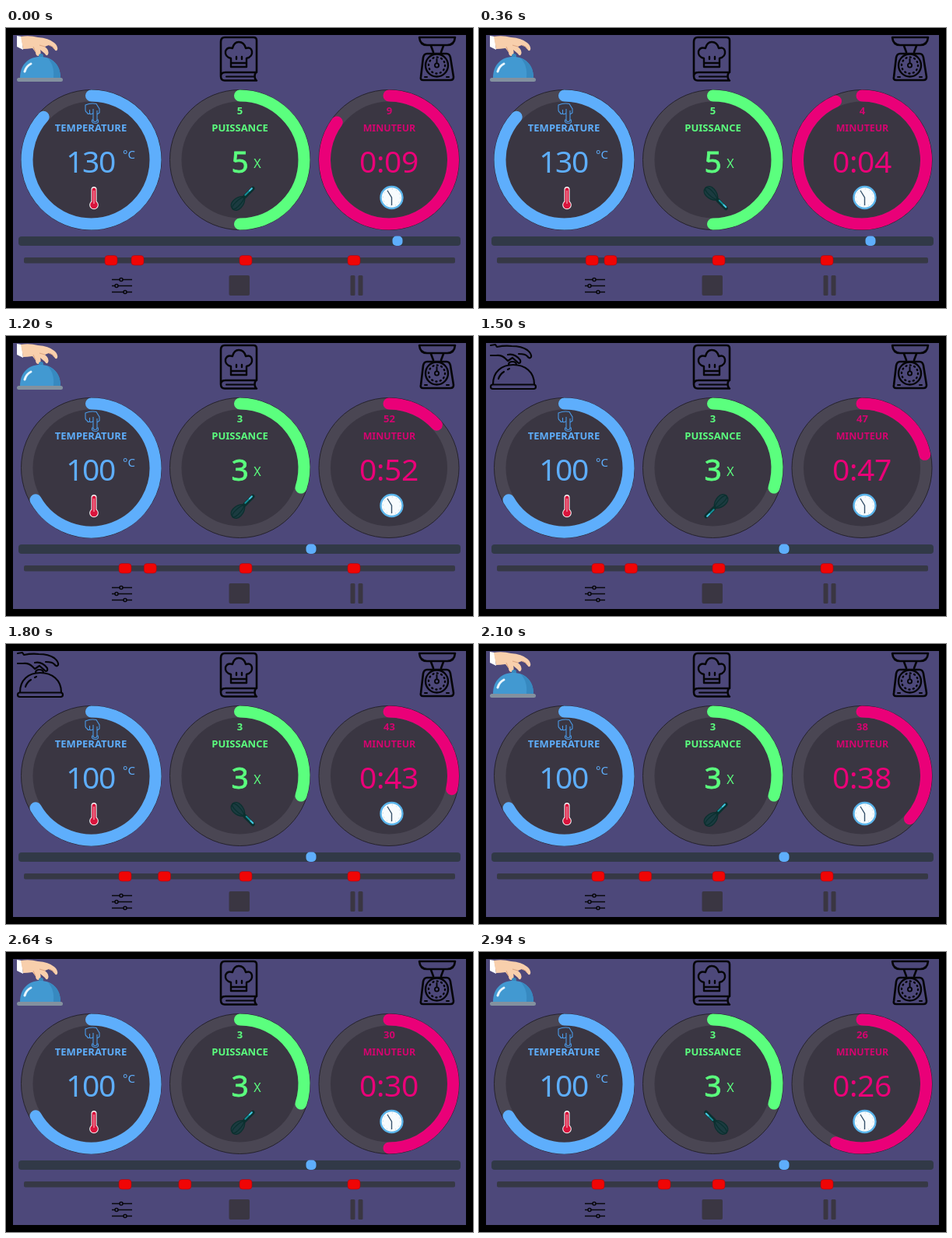
Animation of 600x360 px, one loop 3000 ms. Source, as an HTML page:

```html
<!DOCTYPE html>
<html lang="fr">
<head>
<meta charset="utf-8">
<title>Robot de cuisine</title>
<style>
  html, body { margin: 0; width: 100%; height: 100%; overflow: hidden; background: #000; }
  svg { display: block; width: 600px; height: 360px; }
  text { text-anchor: middle; }
  .title { font: bold 13px "Noto Sans", sans-serif; }
  .value { font: 39px "Noto Sans", sans-serif; letter-spacing: -1.4px; }
  .unit { font: 16px "Noto Sans", sans-serif; }
  .line { fill: none; stroke: #050508; stroke-linecap: round; stroke-linejoin: round; }
  .arc { fill: none; stroke-width: 15; stroke-linecap: round; }
</style>
</head>
<body>
<svg viewBox="0 0 600 360">
  <rect x="9" y="9" width="582" height="342" fill="#4d487a"/>

  <!-- serving dome -->
  <g id="domeColor">
    <path d="M14 10L20 11L22 28L14 24Z" fill="#fff"/>
    <path d="M19 11Q30 9 41 12Q55 13 62 19Q67 23 66 28Q64 31 62 27Q60 23 55 22L50 24Q56 29 54 34Q52 37 50 33L44 28Q46 33 42 36Q38 36 38 31L34 26Q27 27 22 27Z" fill="#f8cfac"/>
    <path d="M50 24L43 22M38 31L35 24M62 27Q60 23 55 22" fill="none" stroke="#dca582"/>
    <circle cx="45" cy="36" r="3" fill="#3889bd"/>
    <path d="M18 64C18 47 29 37 44 37S70 47 70 64Z" fill="#4299d1"/>
    <path d="M54 39C65 43 70 52 70 64H61C62 54 60 46 54 39Z" fill="#3789c0"/>
    <path d="M24 56Q26 49 32 46" fill="none" stroke="#e9f6ff" stroke-width="3" stroke-linecap="round"/>
    <rect x="14" y="64" width="59" height="5" rx="2.5" fill="#83919f"/>
  </g>
  <g id="domeLine" class="line" stroke-width="2.2">
    <path d="M15 12L21 11L23 14Q33 12 42 13Q55 13 62 18Q68 23 67 27Q65 30 62 26Q60 23 51 23M15 25L22 25Q29 24 34 29M37 24Q46 22 53 31Q54 35 51 35L43 28L37 32L34 29"/>
    <path d="M38 37Q38 33 43 33Q48 33 48 37M18 62C18 46 29 37 44 37S71 46 71 62M25 55Q27 49 32 46M37 43L39 42"/>
    <rect x="15" y="62.500" width="58" height="5.500" rx="2.700"/>
  </g>

  <!-- recipe book -->
  <g class="line" stroke-width="2.600">
    <path d="M322 57V16Q322 12 318 12H281Q276 12 276 18V62Q276 67.500 281 67.500H322M322 57H282Q276 57 276 62M321 57Q318 62 321 67"/>
    <path d="M283 62.500H318" stroke-width="2"/>
    <path d="M289 50V39Q281 37 282 30Q284 24 291 26Q293 18 299 18Q306 18 308 26Q315 24 316 30Q317 37 309 39V50ZM289 45H309M296 37V40M303 37V40" stroke-width="2.400"/>
  </g>

  <!-- scale -->
  <g class="line" stroke-width="2.600">
    <path d="M531 12H577Q576 22 567 22H541Q532 22 531 12ZM546 23L549 31M562 23L559 31M541 33H566Q570 33 571 38L575 63Q575 67 571 67H536Q532 67 533 63L536 38Q537 33 541 33Z"/>
    <circle cx="553.500" cy="48" r="14.500" stroke-width="2.400"/>
    <circle cx="553.500" cy="48" r="10.500" stroke-width="2.400" stroke-dasharray="1 4.500"/>
    <circle cx="553.500" cy="48" r="2.600" stroke-width="1.800"/>
    <path d="M553.500 45V40M538 63H541M566 63H569" stroke-width="2"/>
  </g>

  <g id="dials"></g>

  <!-- pointing hand -->
  <path d="M102 99Q109 96 116 97.500L120 104V109L117 111V118Q117 120.500 114.500 120.500T112 118V109Q110 112 107.500 110Q105 111.500 104 108.500Q102 108 102 105ZM107.500 105V110M112 104V109M117 106V111M111 117.500Q109 122 114.500 122.500T118 117.500" fill="none" stroke="#4a99e6" stroke-width="1.100"/>

  <g class="title">
    <text x="109" y="133" fill="#5eaefc">TEMPERATURE</text>
    <text x="300.500" y="133" fill="#5bff7e">PUISSANCE</text>
    <text x="492.500" y="133" fill="#d4046f" style="font-size:12.400px">MINUTEUR</text>
    <text id="powerSmall" x="300.500" y="111" fill="#5bff7e"></text>
    <text id="timeSmall" x="492.500" y="111" fill="#d4046f"></text>
  </g>
  <g class="value">
    <text id="temp" x="108.500" y="186" fill="#5eaefc"></text>
    <text id="power" x="300" y="186" fill="#5bff7e" stroke="#5bff7e" stroke-width=".8"></text>
    <text id="time" x="492" y="186" fill="#ea0078" style="letter-spacing:-.4px"></text>
  </g>
  <text class="unit" x="158" y="168" fill="#5eaefc" style="font-size:15px">°C</text>
  <text class="unit" x="323" y="179.500" fill="#5bff7e">X</text>

  <!-- thermometer -->
  <rect x="109.500" y="204" width="7" height="24" rx="3.500" fill="#fff"/>
  <circle cx="113" cy="227.500" r="5.800" fill="#fff"/>
  <rect x="110.500" y="205.500" width="5" height="20" rx="2.500" fill="#d9143c"/>
  <circle cx="113" cy="227.500" r="4.800" fill="#d9143c"/>
  <path d="M113 209V226" stroke="#f5c3cc" fill="none"/>

  <g id="whisk" fill="none" stroke="#0b302f" stroke-linecap="round">
    <path d="M3 0C-4 -9 -19 -9 -19 0S-4 9 3 0Z" fill="#1b3b40" stroke-width="1.300"/>
    <path d="M3 0C-4 -4 -19 -4 -19 0S-4 4 3 0" stroke-width="1.300"/>
    <path d="M3 0H18" stroke-width="5"/>
    <path d="M5 -1H17" stroke="#168f98" stroke-width="2"/>
    <path d="M13 -1H17" stroke="#43c3dc" stroke-width="2"/>
  </g>

  <!-- clock -->
  <circle cx="495.500" cy="218" r="14" fill="#f7fbfd" stroke="#5bb4ea" stroke-width="2.400"/>
  <circle cx="495.500" cy="218" r="11" fill="none" stroke="#b7cbd8" stroke-dasharray="1 4.760"/>
  <path d="M490 209L495.500 218V228" fill="none" stroke="#37526b" stroke-width="1.400"/>

  <!-- sliders -->
  <rect x="16" y="268" width="568" height="12" rx="4" fill="#313947"/>
  <rect id="knob" x="-6.500" y="267.500" width="13" height="12.500" rx="5" fill="#5eaefc"/>
  <rect x="23" y="295" width="554" height="7.500" rx="2" fill="#363845"/>
  <g id="marks"></g>

  <!-- buttons -->
  <g stroke="#08080c" stroke-width="1.500" fill="#4d487a">
    <path d="M136 323.500H162M136 331.500H162M136 339.500H162"/>
    <circle cx="148" cy="323.500" r="2"/>
    <circle cx="142" cy="331.500" r="2"/>
    <circle cx="153" cy="339.500" r="2"/>
  </g>
  <g fill="#3a3642">
    <rect x="286.500" y="318" width="26.500" height="26" rx="2"/>
    <rect x="442.500" y="318" width="6" height="26" rx="1.500"/>
    <rect x="452.500" y="318" width="6" height="26" rx="1.500"/>
  </g>
</svg>
<script>
const LOOP = 3000, TICK = 60, SWITCH = 11;
const RATE = 0.892; // countdown seconds per tick
const RADIUS = 82.5, CY = 169.5;
const $ = id => document.getElementById(id);

function add(parent, tag, attrs) {
  const el = document.createElementNS("http://www.w3.org/2000/svg", tag);
  for (const key in attrs) el.setAttribute(key, attrs[key]);
  return parent.appendChild(el);
}

function makeDial(cx, color) {
  const g = $("dials");
  add(g, "circle", { cx, cy: CY, r: 90, fill: "#4a4653", stroke: "#25222c", "stroke-width": 1 });
  add(g, "circle", { cx, cy: CY, r: 75, fill: "#3a3642" });
  const arc = add(g, "path", { class: "arc", stroke: color });
  return degrees => {
    const a = degrees * Math.PI / 180;
    const x = cx + RADIUS * Math.sin(a) + 0.01, y = CY - RADIUS * Math.cos(a);
    arc.setAttribute("d", `M${cx} ${CY - RADIUS}A${RADIUS} ${RADIUS} 0 ${+(degrees > 180)} 1 ${x} ${y}`);
  };
}

const setTemp = makeDial(109.5, "#5eaefc");
const setPower = makeDial(300.5, "#5bff7e");
const setTime = makeDial(492, "#ea0078");
const marks = [135, 169, 308, 447].map(() =>
  add($("marks"), "rect", { x: -8, y: 292.5, width: 16, height: 12.5, rx: 4, fill: "#f00505", stroke: "#a00a18", "stroke-width": 0.6 }));
const moveX = (el, x) => el.setAttribute("transform", `translate(${x} 0)`);

function draw(tick) {
  const first = tick < SWITCH;
  const temp = first ? 130 : 100;
  const power = first ? 5 : 3;
  const left = Math.floor(first ? 9.5 - RATE * tick : 59.5 - RATE * (tick - 12));

  setTemp(temp / 150 * 360);
  setPower(power * 36);
  setTime((60 - left) * 6);
  $("temp").textContent = temp;
  $("power").textContent = $("powerSmall").textContent = power;
  $("timeSmall").textContent = left;
  $("time").textContent = Math.floor(left / 60) + ":" + String(left % 60).padStart(2, "0");

  moveX($("knob"), 392 + (temp - 100) * 3.7);
  const stops = [first ? 153.3 - 2.03 * left : 153, first ? 169 : 169 + 2.03 * (60 - left), 308, 447];
  marks.forEach((mark, i) => moveX(mark, stops[i]));

  // quarter turns, faster at higher power
  const turns = Math.floor(first ? 0.5 + RATE * tick : 11.85 + 0.6 * RATE * (tick - 12));
  $("whisk").setAttribute("transform", `translate(304.5 219) rotate(${turns * 90 - 45})`);

  const lit = Math.floor(0.8 + RATE * tick) % 2 === 0;
  $("domeColor").style.display = lit ? "" : "none";
  $("domeLine").style.display = lit ? "none" : "";
}

const start = performance.now();
function loop() {
  draw(Math.floor((performance.now() - start) % LOOP / TICK));
  requestAnimationFrame(loop);
}
loop();
</script>
</body>
</html>
```
